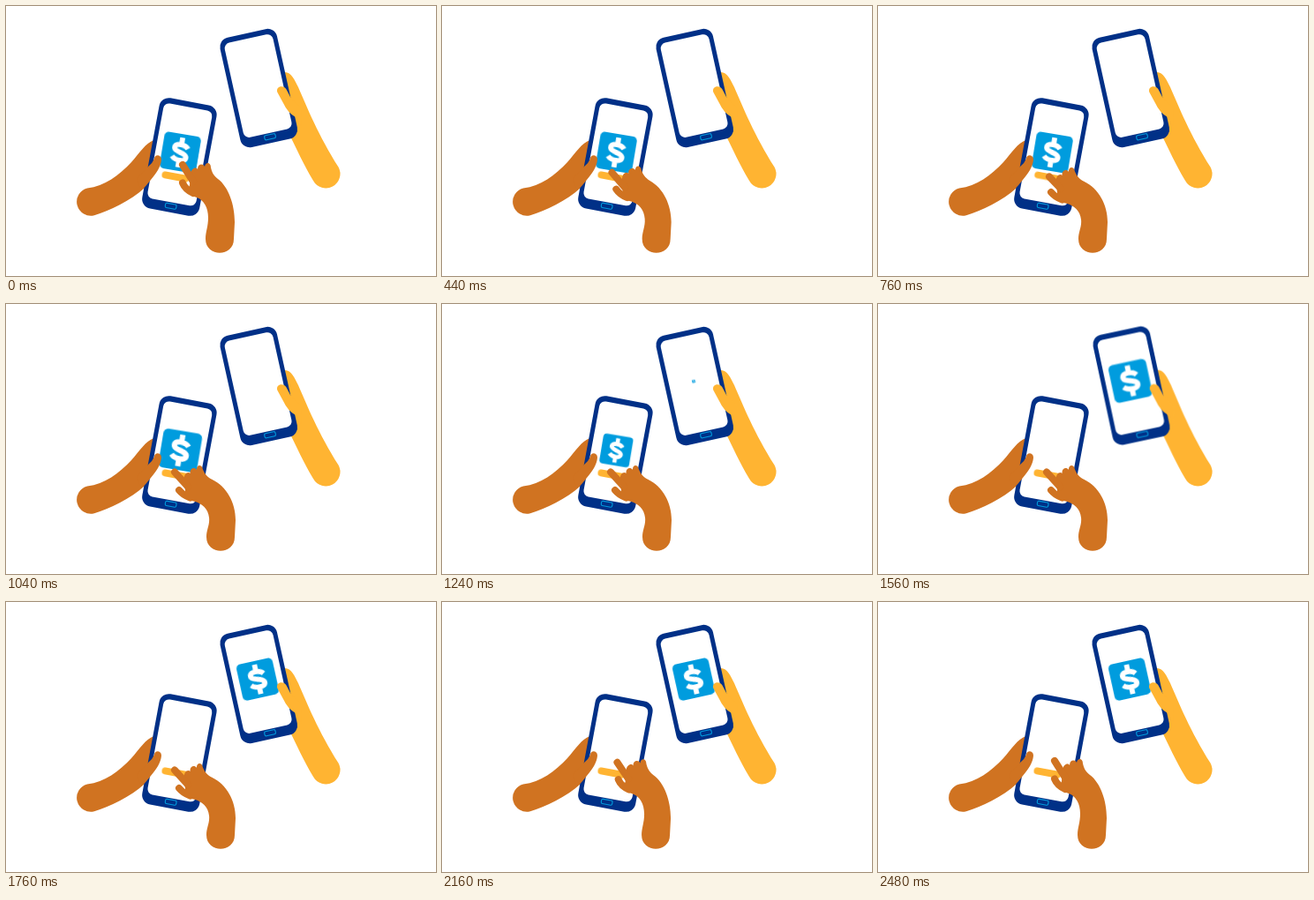
An HTML page that plays this animation: 487x306 px, repeating every 3160 ms.

```html
<!DOCTYPE html>
<html lang="en">
<head>
<meta charset="utf-8">
<title>Sending money between phones</title>
<style>
  html, body { margin: 0; width: 100%; height: 100%; overflow: hidden; background: #fff; }
  svg { display: block; width: 100%; height: 100%; }

  .navy { fill: #003087; }
  .screen { fill: #fff; }
  .home { fill: none; stroke: #009cde; stroke-width: 1.1; }
  .tile { fill: #009cde; }
  .sign { fill: none; stroke: #fff; stroke-width: 5.7; }
  .gold { fill: #ffb432; }
  .brown { fill: #d07321; }
  .digit { fill: none; stroke: #d07321; stroke-width: 8; stroke-linecap: round; stroke-linejoin: round; }
  .bar { fill: none; stroke: #ffb432; stroke-width: 8; stroke-linecap: round; }

  .palm, .index, .thumb, .press, .out, .in, .soft-out, .soft-in, .tilt {
    animation: 3160ms linear infinite;
  }
  .palm { animation-name: palm; }
  .index { animation-name: index; }
  .thumb { animation-name: thumb; }
  .press { animation-name: press; }
  .out { animation-name: out; }
  .in { animation-name: in; }
  .soft-out { animation-name: soft-out; }
  .soft-in { animation-name: soft-in; }
  .tilt { animation-name: tilt; transform-origin: 362px 200px; }

  /* tapping hand: raised pose and lowered pose */
  @keyframes palm {
    0%, 6.6%, 73%, 100% {
      d: path("M209 190C210 184 215 182 217 185C217 179 223 178 225 182C226 176 232 177 232 183C233 188 235 192 240 196C252 205 259 225 259 245L258 264C258 285 226 285 226 264C226 256 229 250 229 240C229 228 224 220 216 217C212 216 208 213 206 209L208 203Z");
      animation-timing-function: cubic-bezier(.4, 0, .3, 1);
    }
    22%, 58.2% {
      d: path("M201.6 198.4C201.6 192.3 206.1 189.4 208.6 192.1C207.5 186.2 213.3 184.1 215.9 187.7C215.9 181.6 221.9 181.5 223 187.4C224.9 192.2 227.6 195.7 233.2 198.8C250 207 260 225 260 245L259 264C259 285 227 285 227 264C227 256 231 250 230 242C229 232 222 226 213.4 223.7C209.2 223.5 204.8 221.2 202.1 217.6L203 211.4Z");
      animation-timing-function: cubic-bezier(.35, 0, .2, 1);
    }
  }
  @keyframes thumb {
    0%, 6.6%, 73%, 100% {
      d: path("M200 200.5Q203 208 212 212");
      animation-timing-function: cubic-bezier(.4, 0, .3, 1);
    }
    22%, 58.2% {
      d: path("M196 211Q200.5 216.5 208.5 219.5");
      animation-timing-function: cubic-bezier(.35, 0, .2, 1);
    }
  }
  @keyframes index {
    0%, 6.6%, 77.2%, 100% {
      d: path("M200 180L212 199");
      animation-timing-function: cubic-bezier(.4, 0, .3, 1);
    }
    19% { d: path("M191 190.5L206 207"); animation-timing-function: ease-in-out; }
    24% { d: path("M194 193.5L207 207"); animation-timing-function: ease-in-out; }
    30%, 58.2% {
      d: path("M191 190.5L206 207");
      animation-timing-function: cubic-bezier(.33, 0, .2, 1);
    }
  }

  @keyframes press {
    0%, 19%, 30%, 100% { transform: scale(1); }
    24% { transform: scale(.95); }
  }

  /* tile leaves one phone and arrives on the other */
  @keyframes out {
    0%, 24.7% { transform: scale(1); animation-timing-function: ease-out; }
    33% { transform: scale(1.06); animation-timing-function: ease-in; }
    39.24% { transform: scale(.82); }
    44.3% { transform: scale(.22); }
    47%, 100% { transform: scale(0); }
  }
  @keyframes in {
    0%, 38.2% { transform: scale(0); }
    39.24% { transform: scale(.08); }
    44.3% { transform: scale(.5); animation-timing-function: ease-out; }
    50% { transform: scale(1.05); animation-timing-function: ease-in-out; }
    55.5%, 100% { transform: scale(1); }
  }
  @keyframes soft-out {
    0%, 35% { filter: blur(0); }
    39.24% { filter: blur(.4px); }
    44.3%, 100% { filter: blur(0); }
  }
  @keyframes soft-in {
    0%, 38% { filter: blur(0); }
    39.24% { filter: blur(.4px); }
    44.3% { filter: blur(.55px); }
    50%, 100% { filter: blur(0); }
  }
  @keyframes tilt {
    0%, 39.24% { transform: rotate(0); animation-timing-function: ease-out; }
    44.3% { transform: rotate(1.15deg); animation-timing-function: ease-in-out; }
    53%, 100% { transform: rotate(0); }
  }
</style>
</head>
<body>
<svg viewBox="0 0 487 306" preserveAspectRatio="none">
  <defs>
    <g id="phone">
      <rect class="navy" x="-33" y="-63.7" width="66" height="127.4" rx="11"/>
      <rect class="screen" x="-28" y="-57.5" width="56" height="109.7" rx="6.5"/>
      <rect class="home" x="-5.7" y="54" width="12.6" height="5.2" rx="1.6"/>
    </g>
    <g id="money">
      <rect class="tile" x="-20.9" y="-20.9" width="41.8" height="41.8" rx="5"/>
      <path class="sign" d="M8-5.2C4.5-9.8-7.2-10.6-7.2-5C-7.2 .6 7.2-.6 7.2 5C7.2 10.6-4.5 9.8-8.6 5.4M0-17V-8M0 17V8"/>
    </g>
  </defs>

  <!-- receiving phone -->
  <g class="tilt">
    <path class="gold" d="M316 75C323 75 327 84 331 92C341 115 354 147 376.5 182.5A15 15 0 0 1 348 198C337 180 330 163 318 140Z"/>
    <use href="#phone" transform="translate(286.2 93.1) rotate(-12.5)"/>
    <g class="soft-in">
      <g transform="translate(285 87.6) rotate(-12.5)">
        <g class="in"><use href="#money"/></g>
      </g>
    </g>
    <path class="gold" d="M307.2 97.5C305.5 90.5 314.5 89 317.5 94.5L322 103L334 116L335 138L328 126Q319 121 314 110Z"/>
  </g>

  <!-- sending phone -->
  <path class="brown" d="M168 152C158 155 151 167 142 177C128 192 112 204 92 206.5A15 15 0 0 0 100 237.2C117 232 141 221 157 206Z"/>
  <use href="#phone" transform="translate(196.4 171) rotate(10.5)"/>
  <g class="soft-out">
    <g transform="translate(197.4 166) rotate(9.5)">
      <g class="out"><use href="#money"/></g>
    </g>
  </g>
  <g transform="translate(191.8 193.6) rotate(10.5)">
    <path class="bar press" d="M-11.5 0H11.5"/>
  </g>
  <path class="brown" d="M168 173C168 168 176 168 176 174C175.5 182 170 190 164 197C160 202 157 206 153 209L148 196L161 182Q166 178 168 173Z"/>

  <!-- tapping hand -->
  <path class="digit thumb" d="M200 200.5Q203 208 212 212"/>
  <path class="brown palm" d="M209 190C210 184 215 182 217 185C217 179 223 178 225 182C226 176 232 177 232 183C233 188 235 192 240 196C252 205 259 225 259 245L258 264C258 285 226 285 226 264C226 256 229 250 229 240C229 228 224 220 216 217C212 216 208 213 206 209L208 203Z"/>
  <path class="digit index" d="M200 180L212 199"/>
</svg>
</body>
</html>
```
